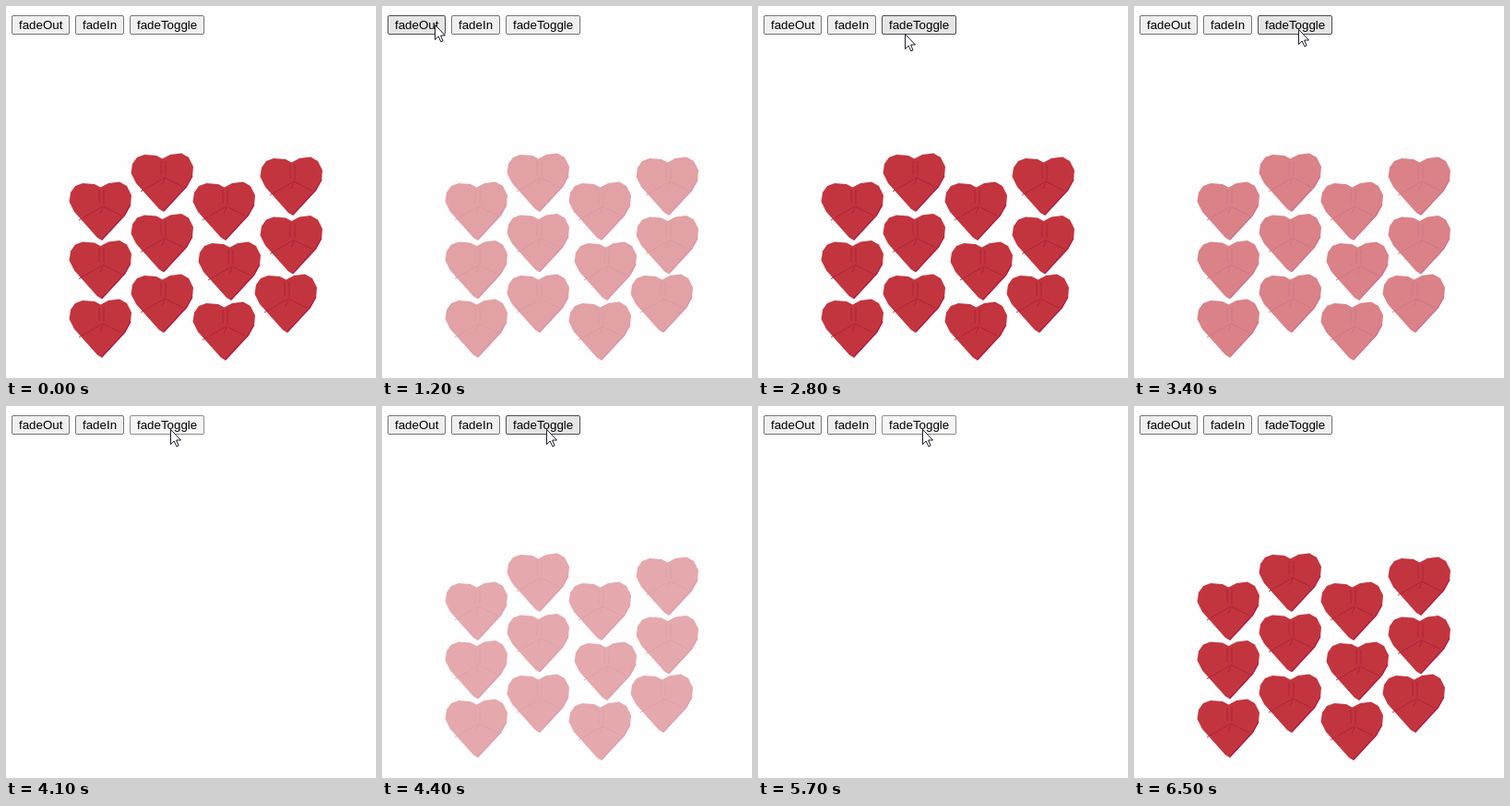
Recreate the animation shown at these times as an HTML page. Size 401x403 px, loop 6900 ms.

```html
<!DOCTYPE html>
<html lang="en">
<head>
<meta charset="utf-8">
<title>Fade buttons</title>
<style>
  html, body { margin: 0; width: 100%; height: 100%; overflow: hidden; background: #fefefe; }
  .btn {
    position: absolute; top: 10px; height: 21px; box-sizing: border-box;
    padding: 0 7px; border: 1px solid #767676; border-radius: 2px;
    background: #efefef; color: #000; white-space: nowrap;
    font: 13.3333px/19px "Liberation Sans", Arial, sans-serif;
  }
  .btn.hover { background: #e5e5e5; border-color: #4f4f4f; }
  .btn.active { background: #f5f5f5; border-color: #8d8d8d; }
  svg { position: absolute; left: 0; top: 0; width: 401px; height: 403px; }
</style>
</head>
<body>
<div class="btn" style="left:6px">fadeOut</div>
<div class="btn" style="left:75px">fadeIn</div>
<div class="btn" style="left:134px">fadeToggle</div>
<svg viewBox="0 0 401 403">
  <defs>
    <g id="heart">
      <path fill="#c3353e" d="M-.5 21L1 11 6 4 14 1 27 2 33.5 5.5 42 1 54-.5 62 4 67 14 66 25 60 36 35 63 30 60 5 32Z"/>
      <path fill="none" stroke="#b01d49" stroke-width="1.3" d="M66 24L59.5 35.5 35 62"/>
      <path fill="none" stroke="#a8233a" stroke-width=".9" d="M10 41L36 26 56 36M36 27L33 34M32 8V23M37 8V24"/>
    </g>
  </defs>
  <g id="hearts"></g>
  <path id="cursor" fill="#fff" stroke="#1c1c28" d="M.5 .5V16.5L4.2 13 6.8 18.8 9 17.9 6.6 12H11.5Z"/>
</svg>
<script>
const LOOP = 6900, STEP = 100, FADE = 400, PRESS = 125;
const SHOW = 100, HIDE = 6500;

// Each stack holds three hearts; lean and bend shift them sideways.
const stacks = [
  { x: 69, y: 191 },
  { x: 136, y: 160, gap: 65.5 },
  { x: 203, y: 191, gap: 65, bend: 6 },
  { x: 276, y: 164, bend: 3, lean: -3 }
];

// Pointer stops, and the moves between them: arc is the height of the control point.
const entry = [307, 56], onOut = [57, 20], onIn = [94, 22], onToggle = [178, 25], exit = [349, 28];
const moves = [
  { at: 100, end: 600, from: entry, to: onOut, arc: 90, power: 2.8 },
  { at: 1700, end: 1900, from: onOut, to: onIn, arc: 22, power: 1 },
  { at: 2500, end: 3000, from: onIn, to: onToggle, arc: 40, power: 1.6 },
  { at: 6200, end: 6400, from: onToggle, to: exit, arc: 27, power: 1 }
];

// Fades alternate: out, in, out, in ...
const fades = [990, 2050, 3230, 4220, 5030, 5820];

const hearts = document.getElementById('hearts');
const cursor = document.getElementById('cursor');
const buttons = [...document.querySelectorAll('.btn')];

for (const { x, y, gap = 63.5, bend = 0, lean = 0 } of stacks) {
  for (let row = 0; row < 3; row++) {
    const use = document.createElementNS('http://www.w3.org/2000/svg', 'use');
    const left = x + lean * row + bend * row * (2 - row);
    use.setAttribute('href', '#heart');
    use.setAttribute('transform', `translate(${left} ${y + gap * row})`);
    hearts.append(use);
  }
}

const clamp = p => Math.min(1, Math.max(0, p));
const swing = p => 0.5 - Math.cos(Math.PI * clamp(p)) / 2;
const easeOut = (p, power) => 1 - (1 - clamp(p)) ** power;

function opacityAt(t) {
  const i = fades.findLastIndex(at => at <= t);
  if (i < 0) return 1;
  const p = swing((t - fades[i]) / FADE);
  return i % 2 ? p : 1 - p;
}

function pointerAt(t) {
  const { at, end, from, to, arc, power } = moves.findLast(m => m.at <= t);
  const p = easeOut((t - at) / (end - at), power), q = 1 - p;
  return [
    Math.round(q * from[0] + p * to[0]),
    Math.round(q * q * from[1] + 2 * p * q * arc + p * p * to[1])
  ];
}

function render(t) {
  const shown = t >= SHOW && t < HIDE;
  const [x, y] = shown ? pointerAt(t) : [-1, -1];
  const pressed = fades.some(at => t >= at - PRESS && t < at);

  cursor.style.display = shown ? '' : 'none';
  cursor.setAttribute('transform', `translate(${x} ${y})`);

  for (const b of buttons) {
    const dx = x - b.offsetLeft, dy = y - b.offsetTop;
    const over = dx >= 0 && dx < b.offsetWidth && dy >= 0 && dy < b.offsetHeight;
    b.classList.toggle('hover', over);
    b.classList.toggle('active', over && pressed);
  }
  hearts.style.opacity = opacityAt(t);
}

const start = performance.now();
function tick() {
  const t = (performance.now() - start) % LOOP;
  render(Math.floor(t / STEP) * STEP);
  requestAnimationFrame(tick);
}
tick();
</script>
</body>
</html>
```
